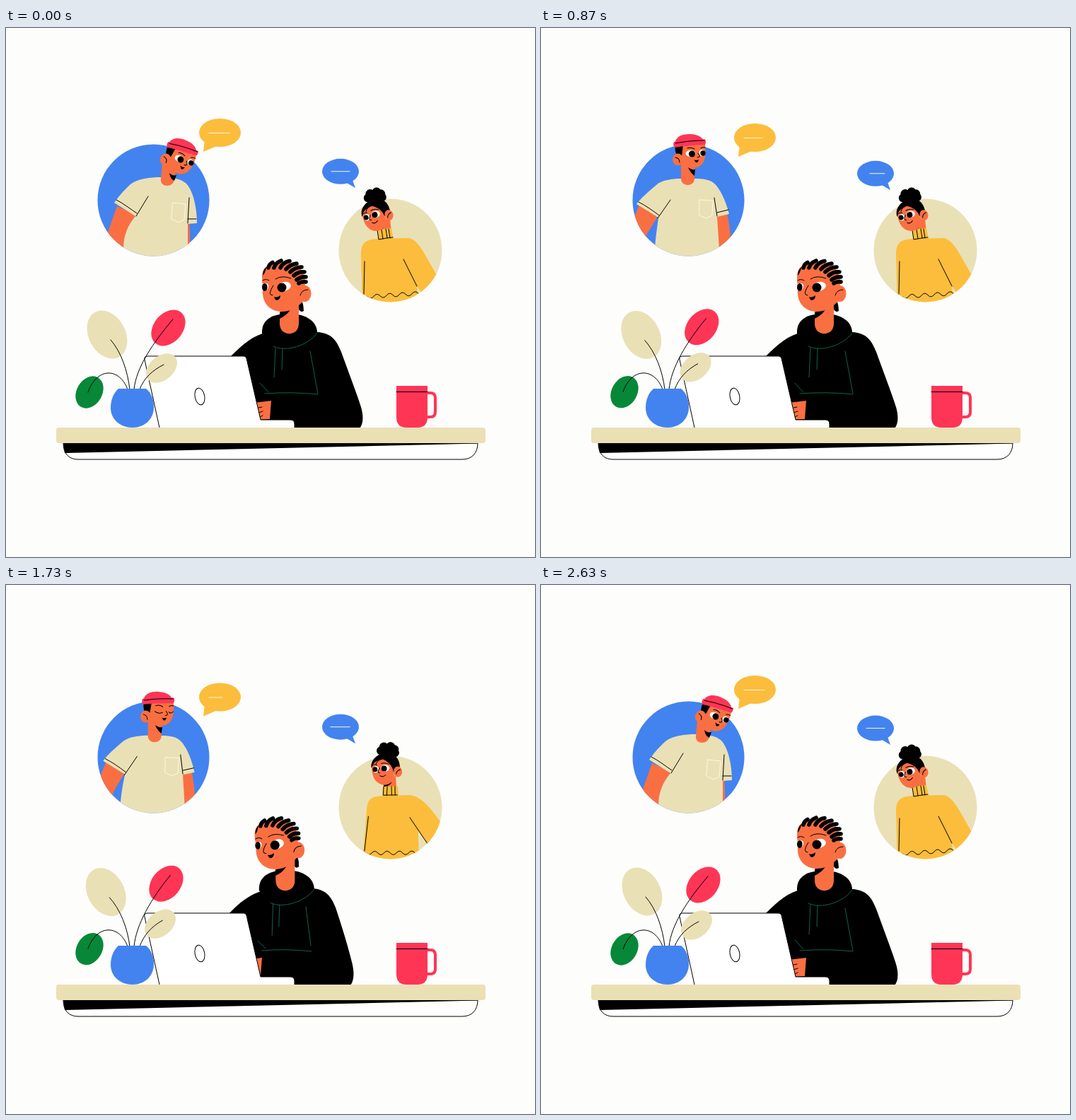
An HTML page for the animation above (2.66 s loop, 748 by 748 pixels).

```html
<!DOCTYPE html>
<html lang="en">
<head>
<meta charset="utf-8">
<title>Remote meeting</title>
<style>
html, body { margin: 0; width: 100%; height: 100%; overflow: hidden; background: #fdfdfb; }
svg { display: block; width: 100%; height: 100%; }
.ln { fill: none; stroke: #000; stroke-width: 1; stroke-linecap: round; stroke-linejoin: round; }
.wh { stroke: #fff6dc; }
.gr { stroke: #0a6650; }
.skin { fill: #fa6f42; }
.red { fill: #ff3556; }
.blue { fill: #4383ef; }
.sand { fill: #eae0b6; }
.gold { fill: #fcbd3c; }
.white { fill: #fff; }
.braid { fill: none; stroke: #000; stroke-width: 5.6; stroke-linecap: round; }
</style>
</head>
<body>
<svg viewBox="0 0 748 748">
  <defs>
    <clipPath id="manClip"><circle cx="208.5" cy="243.5" r="79"/><rect x="130" y="120" width="158" height="85"/></clipPath>
    <clipPath id="womanClip"><circle cx="543.5" cy="314.5" r="73"/></clipPath>
  </defs>

  <!-- man in the cap -->
  <circle class="blue" cx="208.5" cy="243.5" r="79"/>
  <g clip-path="url(#manClip)">
    <path class="skin" data-k="man" d="M139 250L166 264C158 280 152 285 146 300L125 285Z" data-b="M157 252L184 264C172 280 167 295 166 312L140 300Z"/>
    <path class="skin" data-k="man" d="M247 264L263 262C266 275 268 290 268 300L252 312Z" data-b="M256 272L259 274C260 285 260 295 260 306L255 312Z"/>
    <path class="sand" data-k="man" d="M198 213C186 213 170 215 163 222C152 231 141 241 135 249L166 268C164 284 162 296 161 312L165 330L250 330L252 312L249 267L266 263C262 247 254 227 244 219C238 214 228 213 217 213Z"
      data-b="M218 211C205 211 186 213 176 221C166 230 158 240 153 247L183 266C172 279 166 294 166 312L170 330L250 330L257 312L257 277L270 276C270 258 266 232 255 220C250 216 244 213 238 213Z"/>
    <path class="ln" data-k="man" d="M138 246C148 251 158 258 167 265M183 243L165 269M245 240L249 266M249 261L265 257" data-b="M156 243C166 248 176 256 185 262M201 238L184 266M259 240L257 276M257 270L269 270"/>
    <path class="ln wh" data-k="man" d="M224 243L243 244L242 265L234 269L224 265Z" data-b="M236 247L254 249L252 271L244 275L234 270Z"/>
    <path class="skin" data-k="man" d="M198 186L217 186L217 213C217 225 198 225 198 213Z" data-b="M221 190L241 198L238 214C237 226 218 226 219 214Z"/>
    <path data-k="man" d="M208 197C211 199 214 201 218 200L217 209C213 206 210 202 208 197Z" data-b="M231 205C234 208 237 209 241 208L238 216C234 214 232 211 231 205Z"/>
  </g>
  <g id="manHead">
    <path d="M190 166H206V180H192C190 176 189 171 190 166Z"/>
    <path class="skin" d="M201 165H232C233 174 233 183 230 189C226 197 217 200 208 197L198 190Z"/>
    <ellipse class="skin" cx="193.500" cy="186" rx="7.500" ry="8.500"/>
    <path class="ln" d="M190 183Q196 184 196 190"/>
    <g id="manEyes">
      <ellipse class="white" cx="211.500" cy="177.500" rx="7" ry="4.700"/>
      <ellipse class="white" cx="227.500" cy="176.500" rx="4" ry="4.500"/>
      <circle cx="213.500" cy="178" r="4.600"/><circle cx="229" cy="177" r="3.700"/>
    </g>
    <path id="manLids" class="ln" d="M206 178Q211 182 217 179M226 178Q229 181 232 177"/>
    <path class="ln" d="M207 170Q212 168 217 171M226 170Q229 168 232 169M222 177Q227 183 221 183"/>
    <path d="M216 186Q219 188 223 186Q222 191 219 190Z"/>
    <path class="red" d="M189 164C190 153 200 150 210 150C221 150 229 154 230 161Z"/>
    <path class="red" d="M188 161Q210 157 232 157.500Q234 161 232 165Q208 166 189 169Q186 165 188 161Z"/>
    <path class="ln" d="M190 163Q210 159 231 159"/>
  </g>

  <!-- woman in the sweater -->
  <circle class="sand" cx="543.5" cy="314.5" r="73"/>
  <g clip-path="url(#womanClip)">
    <path class="gold" data-k="woman" d="M526 298C510 299 502 302 502 320L504 392L584 392L581 365L600 392L615 358C598 334 586 300 570 297Z"
      data-b="M534 298C518 299 512 302 511 318L504 392L584 392L583 345L600 370L620 340C605 320 590 298 570 297Z"/>
    <path class="ln" data-k="woman" d="M511 380q4.500 5 9 -.6t9 -.6t9 -.6t9 -.6t9 -.6t9 -.6t9 -.6t9 -.6" data-b="M508 379q4.500 5 8.700 0t8.700 0t8.700 0t8.700 0t8.700 0t8.700 0t8.700 0t8.700 0"/>
    <path class="ln" data-k="woman" d="M507 330L506 376M562 327L581 365" data-b="M513 327L507 376M572 329L597 365"/>
  </g>
  <path class="skin" data-k="woman" d="M525 272L543 270L545 288L527 290Z" data-b="M535 272L552 270L553 288L536 288Z"/>
  <path data-k="woman" d="M525 283Q531 283 536 277L534 283Q530 287 525 288Z" data-b="M535 281Q541 281 547 276L546 280Q541 285 535 285Z"/>
  <path class="gold" data-k="woman" d="M525 286Q535 283 545 283L548 299L527 301Z" data-b="M534 285Q544 284 555 285L556 299L533 299Z"/>
  <path class="ln" data-k="woman" d="M525 286L527 299Q537 297 547 296M531 285L533 298M537 284L539 297M541 284L543 297" data-b="M535 285L534 297Q544 297 554 297M540 285L539 297M546 285L546 297M551 285L551 297"/>
  <g id="womanHead">
    <path d="M528 238A6 6 0 0 1 530 228A6.500 6.500 0 0 1 541 224A6.500 6.500 0 0 1 552 226A6 6 0 0 1 557 234A6 6 0 0 1 553 243Q540 248 528 238Z"/>
    <path d="M518 257C517 245 530 236 542 237C555 239 560 249 558 264H536Z"/>
    <path class="skin" d="M519 256C521 250 527 247 535 246C544 250 548 257 549 263L551 272C547 281 538 284 531 281C522 278 518 268 519 256Z"/>
    <ellipse class="skin" cx="555.500" cy="264" rx="6" ry="7.500"/>
    <path class="ln" d="M553 267Q554 262 559 261"/>
    <path class="ln" d="M532 246Q527 247 525 252M527 245Q521 248 519 255"/>
    <ellipse class="white" cx="537.500" cy="258.500" rx="6.300" ry="4.700"/>
    <ellipse class="white" cx="524.500" cy="260" rx="4.300" ry="4.700"/>
    <circle cx="536" cy="259" r="4.100"/><circle cx="523.300" cy="260" r="3.500"/>
    <path class="ln" d="M520 254Q523 252 526 254M532 252Q537 250 543 253M530 258Q525 265 530 265"/>
    <path class="ln" d="M530 269Q534 272 538 268"/>
  </g>

  <!-- speech bubbles -->
  <g id="goldBubble">
    <ellipse class="gold" cx="302.500" cy="148" rx="29.500" ry="20"/>
    <path class="gold" d="M281 158L279 175L300 166Z"/>
    <path id="goldLine" class="ln wh"/>
  </g>
  <g id="blueBubble">
    <ellipse class="blue" cx="473" cy="202.500" rx="26" ry="18"/>
    <path class="blue" d="M479 217L494 226L489 212Z"/>
    <path id="blueLine" class="ln wh"/>
  </g>

  <!-- person at the desk -->
  <path data-k="body" d="M317 465C335 447 350 434 370 430L440 430C461 431 468 443 474 458C484 486 495 514 502 536C506 550 505 560 500 566L330 566Z" data-b="M315 465C330 449 345 437 364 432L432 429C453 430 460 441 466 456C475 483 483 509 489 533C493 548 492 560 487 566L330 566Z"/>
  <path data-k="head" d="M362 432C361 411 378 404 400 404C426 404 440 416 440 431C428 452 395 462 377 450Z" data-b="M356 432C355 411 372 403 394 403C420 403 434 415 434 430C422 451 389 461 371 449Z"/>
  <path data-k="head" d="M411 384L418 384Q421 392 421 400Q417 403 414 398Z" data-b="M402 382L409 382Q412 390 411 398Q407 401 404 396Z"/>
  <path class="skin" data-k="head" d="M387 385L414 380L414 418C414 437 387 437 387 418Z" data-b="M378 385L406 380L406 418C406 437 379 437 379 418Z"/>
  <path data-k="head" d="M387 402Q398 399 405 390Q403 403 387 411Z" data-b="M378 403Q389 400 396 390Q394 404 379 411Z"/>
  <path class="ln gr" data-k="head" d="M378 450C395 459 428 449 440 431M381 452L379 494M391 453L390 483" data-b="M372 449C389 458 422 447 434 430M376 450L375 496M385 452L384 483"/>
  <path class="ln gr" data-k="body" d="M430 457L441 517M359 502L371 515M366 517Q404 514 441 518" data-b="M424 455L431 510M356 503L367 514M361 517Q396 514 432 518"/>
  <g id="hand">
    <path class="skin" data-k="body" d="M350 530L375 527L373 553L352 554Z" data-b="M338 530L362 527L360 553L340 554Z"/>
    <path class="ln" data-k="body" d="M357 537L362 536M357 544L363 542M359 550L363 548" data-b="M343 537L348 536M343 544L349 542M345 550L349 548"/>
  </g>
  <g id="mainHead">
    <path class="skin" d="M362 352C362 338 372 331 391 331C410 331 422 342 423 358L422 384C412 396 402 401 390 401C375 401 364 391 363 376Z"/>
    <ellipse class="skin" cx="422.500" cy="375.500" rx="9" ry="11.500"/>
    <path class="ln" d="M416 378Q418 370 427 370"/>
    <path class="braid" d="M371 339Q372 334 377 331.500M379 339Q381 332 389 329M388 339Q392 331 401 329.500M396 341Q402 334 411 333M402 345Q409 338 418 338M407 350Q414 344 422 345M411 356Q417 351 424 352M414 361Q418 358 424 359"/>
    <path d="M363 350Q363 342 368 338Q367 346 363 350Z"/>
    <ellipse class="white" cx="393.500" cy="365.500" rx="9.500" ry="6.500" transform="rotate(-14 393.5 365.5)"/>
    <path class="white" d="M362 362Q368 359 371 363Q372 369 367 372Q363 372 362 370Z"/>
    <circle cx="390" cy="367" r="6.500"/>
    <ellipse cx="365.800" cy="366.500" rx="3.800" ry="5.500"/>
    <path class="ln" d="M363 357Q367 354 372 357M381 355Q390 349 403 354M378 364Q369 378 377 378"/>
    <path d="M379 380Q383 382 388 378Q388 385 382 385Q380 384 379 380Z"/>
  </g>

  <!-- laptop -->
  <path class="white" d="M196 469Q195 464 200 464H336Q339 464 340 467L360 554H402Q408 554 408 560V566H217Z"/>
  <path class="ln" d="M217 565L196 469Q195 464 200 464H336Q339 464 340 467L360 554H402Q408 554 408 560V565"/>
  <ellipse class="ln" cx="274" cy="521" rx="6.800" ry="12" transform="rotate(-11 274 521)"/>

  <!-- plant -->
  <g id="leaves">
    <ellipse class="sand" rx="26" ry="36"/>
    <ellipse class="red" rx="20.500" ry="28.500"/>
    <ellipse class="sand" rx="17" ry="25"/>
    <ellipse fill="#078838" rx="18" ry="24"/>
  </g>
  <path class="ln" data-k="plant" d="M175 511C172 485 163 458 148 441M181 511C184 480 208 445 236 412M189 511C195 495 207 484 223 476M172 511C160 479 128 480 116 515" data-b="M175 511C172 485 161 458 146 442M181 511C184 480 205 443 232 410M189 511C195 495 205 483 221 474M172 511C160 479 128 480 116 514"/>
  <path class="blue" d="M159 510H198C206 516 209 527 209 536C209 553 196 565 179 565C161 565 148 553 148 537C148 526 152 516 159 510Z"/>

  <!-- mug -->
  <path class="red" d="M552 506H596V550Q596 565 582 565H566Q552 565 552 550Z"/>
  <path fill="none" stroke="#ff3556" stroke-width="4" d="M595 516H600Q607 516 607 523V543Q607 550 600 550H595"/>
  <path class="ln" d="M552 514.500H596"/>

  <!-- desk -->
  <path class="white" stroke="#000" d="M81 587H667C667 601 659 610 645 610H102C89 610 81 602 81 587Z"/>
  <path d="M81 587H667V587.600L83 601Z"/>
  <rect fill="#ebdfb4" x="71" y="565" width="607" height="22" rx="4"/>
</svg>
<script>
const LOOP = 2660;
const $ = id => document.getElementById(id);
const mix = (a, b, k) => a + (b - a) * k;
const clamp = x => Math.max(0, Math.min(1, x));
const smooth = x => x * x * (3 - 2 * x);
const linear = x => x;

// Value at time t along [time, value] stops.
function track(t, stops, ease = smooth) {
  let i = 1;
  while (i < stops.length - 1 && t > stops[i][0]) i++;
  const [t0, v0] = stops[i - 1], [t1, v1] = stops[i];
  return mix(v0, v1, ease(clamp((t - t0) / (t1 - t0))));
}

const NUM = /-?\d*\.?\d+/g;
const morphs = [...document.querySelectorAll('[data-k]')].map(el => {
  const d = el.getAttribute('d');
  return { el, d, a: d.match(NUM).map(Number), b: el.dataset.b.match(NUM).map(Number), key: el.dataset.k };
});

function morph(m, k) {
  let i = 0;
  m.el.setAttribute('d', m.d.replace(NUM, () => {
    const v = mix(m.a[i], m.b[i], k).toFixed(2);
    return (i++ ? ' ' : '') + v;
  }));
}

const LEAN = [[0, 1], [530, .86], [870, 0], [1370, .06], [1730, .13], [2170, 1.1], [2630, 1]];
const TURN = [[0, 0], [530, -.1], [870, 0], [1370, 1], [1730, .9], [2170, .23], [2630, 0]];
const BODY = [[0, 0], [900, 0], [1330, 1], [2190, 1], [2600, 0]];
const HEAD = [[0, 0], [900, 0], [1370, 1], [1730, .7], [2170, .32], [2630, 0]];
const FLOAT = [[0, 0], [530, 4], [870, 7], [1370, 10.5], [1730, 10.5], [2170, 6.5], [2630, 0]];
const GOLD_END = [[0, 316], [530, 308], [870, 313], [1370, 316], [1730, 306], [2170, 316], [2630, 316]];
const BLUE_START = [[0, 460], [530, 467], [870, 465], [1370, 459], [1730, 459], [2170, 472], [2630, 460]];
// Pose: x, y, angle, drift x, drift y
const LEAVES = [[143, 433.5, -28, -2, .7], [229.5, 424, 40, -3.5, -2], [220, 481, 50, -2.2, -2], [118, 515, 30, 0, -.5]];

const place = (id, x, y, turn, cx, cy) =>
  $(id).setAttribute('transform', `translate(${x} ${y}) rotate(${turn}) translate(${-cx} ${-cy})`);
const blink = (t, mid) => clamp((Math.abs(t - mid) - 35) / 65);

function draw(t) {
  const phase = t / LOOP * Math.PI * 2;
  const pose = {
    man: track(t, LEAN),
    woman: track(t, TURN),
    body: track(t, BODY),
    head: track(t, HEAD),
    plant: (1 - Math.cos(phase - .2)) / 2
  };
  morphs.forEach(m => morph(m, pose[m.key]));

  place('manHead', mix(212, 246, pose.man), mix(177, 184.5, pose.man), 22 * pose.man, 212, 177);
  place('womanHead', mix(525, 540, pose.woman), mix(262.3, 258, pose.woman), 13 * (pose.woman - 1), 540, 258);
  place('mainHead', 393 - 14 * pose.head, 365 + pose.head, -4 * pose.head, 393, 365);

  const open = Math.min(blink(t, 530), blink(t, 1730));
  $('manEyes').setAttribute('transform', `translate(0 ${178 * (1 - open)}) scale(1 ${open})`);
  $('manLids').setAttribute('opacity', open < .25 ? 1 : 0);

  $('goldBubble').setAttribute('transform', `translate(0 ${track(t, FLOAT, linear)})`);
  $('blueBubble').setAttribute('transform', `translate(0 ${.5 + 3 * Math.sin(phase - .08)})`);
  $('goldLine').setAttribute('d', `M287 148.500H${track(t, GOLD_END, linear)}`);
  $('blueLine').setAttribute('d', `M${track(t, BLUE_START, linear)} 202.500H486`);

  $('hand').setAttribute('transform', `translate(0 ${-.6 + .6 * Math.cos(phase * 3)})`);
  LEAVES.forEach(([x, y, angle, dx, dy], i) => $('leaves').children[i].setAttribute('transform',
    `translate(${x + dx * pose.plant} ${y + dy * pose.plant}) rotate(${angle})`));
}

const start = performance.now();
function tick() {
  draw((performance.now() - start) % LOOP);
  requestAnimationFrame(tick);
}
tick();
</script>
</body>
</html>
```
